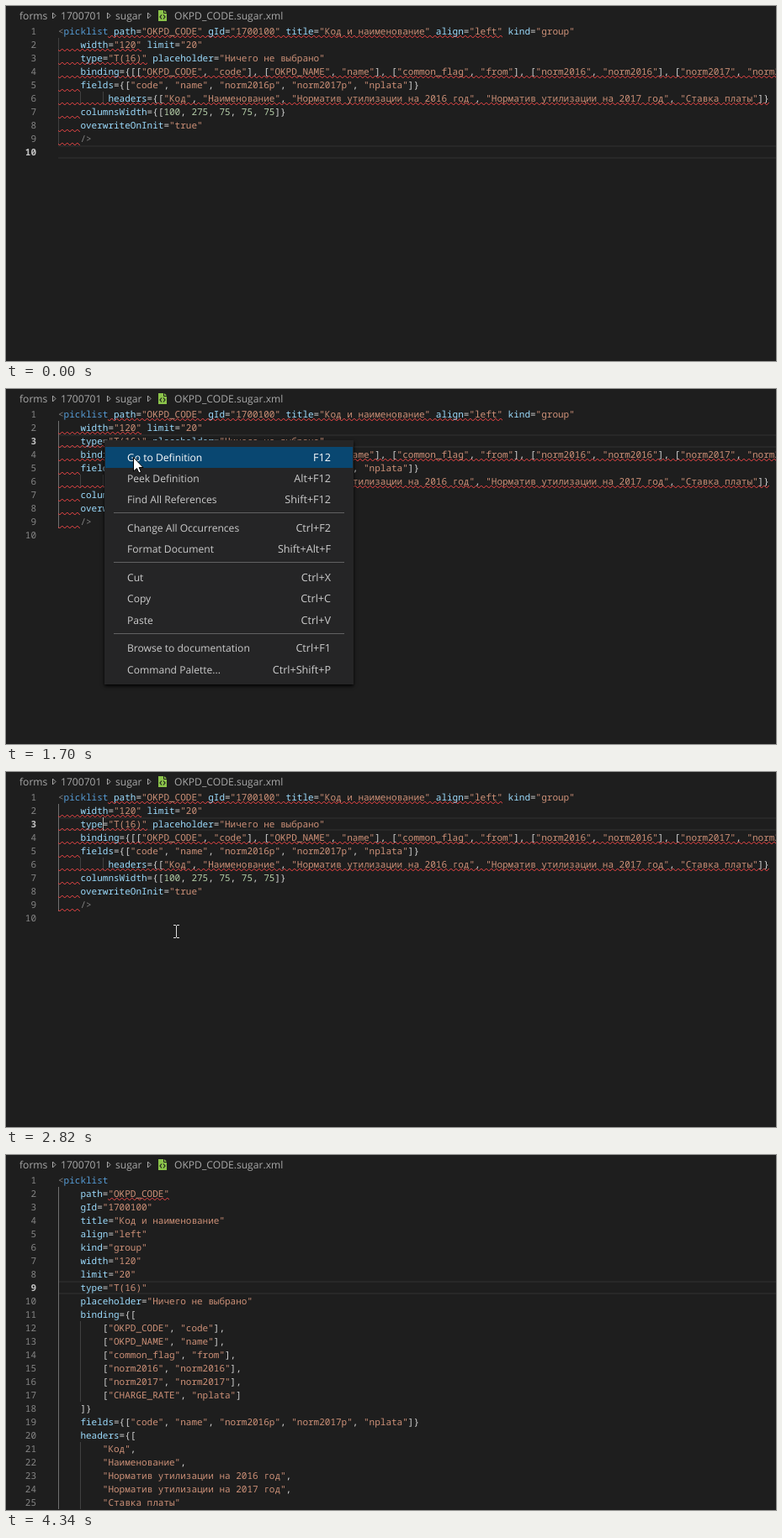
Write an HTML page with a canvas that moves like this. It is 915 px wide and 423 px high and loops after 4660 ms.

```html
<!DOCTYPE html>
<html lang="en">
<head>
<meta charset="utf-8">
<title>Format Document</title>
<style>
  html, body { margin: 0; width: 100%; height: 100%; overflow: hidden; background: #1e1e1e; }
  canvas { display: block; }
</style>
</head>
<body>
<canvas id="stage" width="915" height="423"></canvas>
<script>
const ctx = document.getElementById('stage').getContext('2d');
const LOOP = 4660, LEFT = 62, TOP = 22, LINE = 16, CHAR = 6.6;
const MONO = '11px "Noto Sans Mono", monospace';
const UI = '500 12.1px "Open Sans", sans-serif';
const KEYS = '500 12.6px "Open Sans", sans-serif';

const compact = {
  lines: `<picklist path="OKPD_CODE" gId="1700100" title="Код и наименование" align="left" kind="group"
    width="120" limit="20"
    type="T(16)" placeholder="Ничего не выбрано"
    binding={[["OKPD_CODE", "code"], ["OKPD_NAME", "name"], ["common_flag", "from"], ["norm2016", "norm2016"], ["norm2017", "norm2017"], ["CHARGE_RATE", "nplata"]]}
    fields={["code", "name", "norm2016p", "norm2017p", "nplata"]}
         headers={["Код", "Наименование", "Норматив утилизации на 2016 год", "Норматив утилизации на 2017 год", "Ставка платы"]}
    columnsWidth={[100, 275, 75, 75, 75]}
    overwriteOnInit="true"
    />
`.split('\n'),
  // line: [first column, last column]
  errors: { 1: [9, 80], 2: [0, 15], 3: [0, 16], 4: [0], 5: [0, 4], 6: [0], 7: [0, 4], 8: [0, 4], 9: [0, 4] }
};

const formatted = {
  lines: `<picklist
    path="OKPD_CODE"
    gId="1700100"
    title="Код и наименование"
    align="left"
    kind="group"
    width="120"
    limit="20"
    type="T(16)"
    placeholder="Ничего не выбрано"
    binding={[
        ["OKPD_CODE", "code"],
        ["OKPD_NAME", "name"],
        ["common_flag", "from"],
        ["norm2016", "norm2016"],
        ["norm2017", "norm2017"],
        ["CHARGE_RATE", "nplata"]
    ]}
    fields={["code", "name", "norm2016p", "norm2017p", "nplata"]}
    headers={[
        "Код",
        "Наименование",
        "Норматив утилизации на 2016 год",
        "Норматив утилизации на 2017 год",
        "Ставка платы"`.split('\n'),
  errors: { 2: [9] }
};

// Error ranges left over right after formatting
const staleErrors = { 7: [4], 9: [4], 11: [4], 18: [0, 4], 19: [4, 5], 20: [4] };
for (const n of [2, 3, 4, 5, 12, 13, 14, 15, 16, 17, 21, 22, 23, 24, 25]) staleErrors[n] = [0];
const keptLines = [1, 7, 9, 11, 19, 20];

const menu = [
  [81, 'Go to Definition', 'F12'],
  [106, 'Peek Definition', 'Alt+F12'],
  [131, 'Find All References', 'Shift+F12'],
  [165, 'Change All Occurrences', 'Ctrl+F2'],
  [190, 'Format Document', 'Shift+Alt+F'],
  [224, 'Cut', 'Ctrl+X'],
  [249, 'Copy', 'Ctrl+C'],
  [275, 'Paste', 'Ctrl+V'],
  [308, 'Browse to documentation', 'Ctrl+F1'],
  [334, 'Command Palette...', 'Ctrl+Shift+P']
];

// start, end, intervals, then a quadratic curve: from, control, to
const moves = [
  [530, 1000, 6, 214, 338, 81, 120, 124, 63],
  [1080, 1081, 1, 109, 55, 109, 55, 109, 55],
  [1310, 1311, 1, 120, 61, 120, 61, 120, 61],
  [1630, 2090, 6, 130, 66, 199, 110, 196, 159],
  [2160, 2640, 6, 197, 168, 198, 181, 202, 190],
  [3500, 3790, 4, 206, 196, 232, 232, 334, 361]
];

function pointerAt(t) {
  if (t < 530 || t >= 3870) return null;
  const [start, end, steps, x0, y0, cx, cy, x1, y1] = moves.filter(m => m[0] <= t).pop();
  const u = Math.min(1, Math.floor((t - start) / (end - start) * steps + 0.15) / steps);
  const curve = (a, b, c) => Math.round(a * (1 - u) ** 2 + 2 * b * u * (1 - u) + c * u * u);
  return { x: curve(x0, cx, x1), y: curve(y0, cy, y1) };
}

function rect(x, y, w, h, color) {
  ctx.fillStyle = color;
  ctx.fillRect(x, y, w, h);
}

function text(str, x, y, color, font, align = 'left') {
  ctx.font = font;
  ctx.fillStyle = color;
  ctx.textAlign = align;
  ctx.fillText(str, x, y);
}

function path(points, color, width = 1) {
  ctx.beginPath();
  points.forEach(([x, y]) => ctx.lineTo(x, y));
  ctx.strokeStyle = color;
  ctx.lineWidth = width;
  ctx.stroke();
}

function drawBreadcrumbs() {
  const color = '#a9a9a9';
  [['forms', 16], ['1700701', 65], ['sugar', 130], ['OKPD_CODE.sugar.xml', 200]]
    .forEach(([name, x]) => text(name, x, 16, color, UI));
  for (const x of [55, 120, 168]) path([[x + .5, 8], [x + 4, 11.5], [x + .5, 15], [x + .5, 8]], color);
  ctx.fillStyle = '#8bc34a';
  ctx.beginPath();
  [[181, 5], [188, 5], [191, 8], [191, 18], [181, 18]].forEach(([x, y]) => ctx.lineTo(x, y));
  ctx.fill();
  path([[187.5, 5], [187.5, 8.5], [191, 8.5]], '#1e1e1e');
  path([[185, 10.5], [183, 13], [185, 15.5]], '#1e1e1e', 1.2);
  path([[187, 10.5], [189, 13], [187, 15.5]], '#1e1e1e', 1.2);
}

function drawCode(line, y, plain) {
  const tokens = /("[^"]*")|(<|\/>)|(picklist)|(\d+)|(\w+)|[^\s"\w<]+/g;
  const colors = ['#ce9178', '#808080', '#569cd6', '#b5cea8', '#9cdcfe'];
  for (const match of line.matchAll(tokens)) {
    const kind = match.slice(1).findIndex(Boolean);
    const color = plain || kind < 0 ? '#d4d4d4' : colors[kind];
    text(match[0], LEFT + match.index * CHAR, y, color, '500 ' + MONO);
  }
}

// Zigzag with a 6 px period in the lowest 3 px of the line
function drawSquiggle(from, to, y) {
  const x = Math.round(LEFT + from * CHAR), width = Math.round((to - from) * CHAR), points = [];
  for (let dx = -1.25, low = false; dx < width + 3; dx += 3, low = !low) {
    points.push([x + dx, y + (low ? 16 : 13)]);
  }
  ctx.save();
  ctx.beginPath();
  ctx.rect(x, y + 13, width, 3);
  ctx.clip();
  path(points, '#ea4646');
  ctx.restore();
}

function drawEditor(doc, active, errors, fresh) {
  const activeTop = TOP + (active - 1) * LINE;
  rect(LEFT, activeTop, 853, 2, '#282828');
  rect(LEFT, activeTop + 14, 853, 2, '#282828');
  doc.lines.forEach((line, i) => {
    const n = i + 1, y = TOP + i * LINE, indent = line.search(/\S/);
    for (let col = 0; col < indent; col += 4) {
      const lit = col === 0 && active < 10;
      rect(Math.round(LEFT + col * CHAR), y, 1, LINE, lit ? '#707070' : '#404040');
    }
    const font = n === active ? 'bold ' + MONO : MONO;
    text(n, 36, y + 12, n === active ? '#c6c6c6' : '#858585', font, 'right');
    if (errors[n]) drawSquiggle(errors[n][0], errors[n][1] || line.length, y);
    drawCode(line, y + 12, fresh && !keptLines.includes(n));
  });
}

function drawMenu(pointer, hovering) {
  ctx.save();
  ctx.shadowColor = '#000';
  ctx.shadowBlur = 4;
  ctx.shadowOffsetY = 2;
  rect(117, 61, 296, 291, '#252526');
  ctx.restore();
  for (const y of [147, 206, 291]) rect(128, y, 274, 1, '#616162');
  for (const [y, label, keys] of menu) {
    const on = hovering && Math.abs(pointer.y - y) < 12.7;
    if (on) rect(118, y - 12, 294, 25, '#094771');
    const color = on ? '#ffffff' : '#cccccc';
    text(label, 144, y + 5, color, UI);
    text(keys, 386, y + 5, color, KEYS, 'right');
  }
}

function drawArrow({ x, y }) {
  ctx.beginPath();
  [[0, 0], [0, 16.5], [4, 13], [6.5, 18.5], [9, 17.5], [6.7, 12], [11.5, 12]]
    .forEach(([dx, dy]) => ctx.lineTo(x + dx + .5, y + dy + .5));
  ctx.closePath();
  ctx.fillStyle = '#fff';
  ctx.fill();
  ctx.strokeStyle = '#000';
  ctx.lineWidth = 1;
  ctx.stroke();
}

function drawBeam({ x, y }) {
  rect(x, y - 7, 1, 14, '#e1e1e1');
  for (const edge of [y - 8, y + 7]) {
    rect(x - 3, edge, 3, 1, '#e1e1e1');
    rect(x + 1, edge, 3, 1, '#e1e1e1');
  }
}

function draw(t) {
  const pointer = pointerAt(t), isFormatted = t >= 2880;
  const menuOpen = t >= 1380 && t < 2820, hovering = t >= 1630 && t < 2820;
  const active = isFormatted ? 9 : t >= 1310 ? 3 : 10;
  const doc = isFormatted ? formatted : compact;
  const errors = isFormatted && t < 3110 ? staleErrors : doc.errors;
  const caret = (t >= 1310 && t < 1380) || (t >= 2820 && t < 3340) || (t >= 3870 && t < 4340);

  ctx.textRendering = 'geometricPrecision';
  rect(0, 0, 915, 423, '#1e1e1e');
  drawBreadcrumbs();
  drawEditor(doc, active, errors, isFormatted && t < 2950);
  if (caret) rect(115, TOP + (active - 1) * LINE, 1, LINE, '#aeafad');
  if (menuOpen) drawMenu(pointer, hovering);
  if (pointer) (hovering ? drawArrow : drawBeam)(pointer);
}

const begin = performance.now();
function tick() {
  draw((performance.now() - begin) % LOOP);
  requestAnimationFrame(tick);
}
tick();
</script>
</body>
</html>
```
